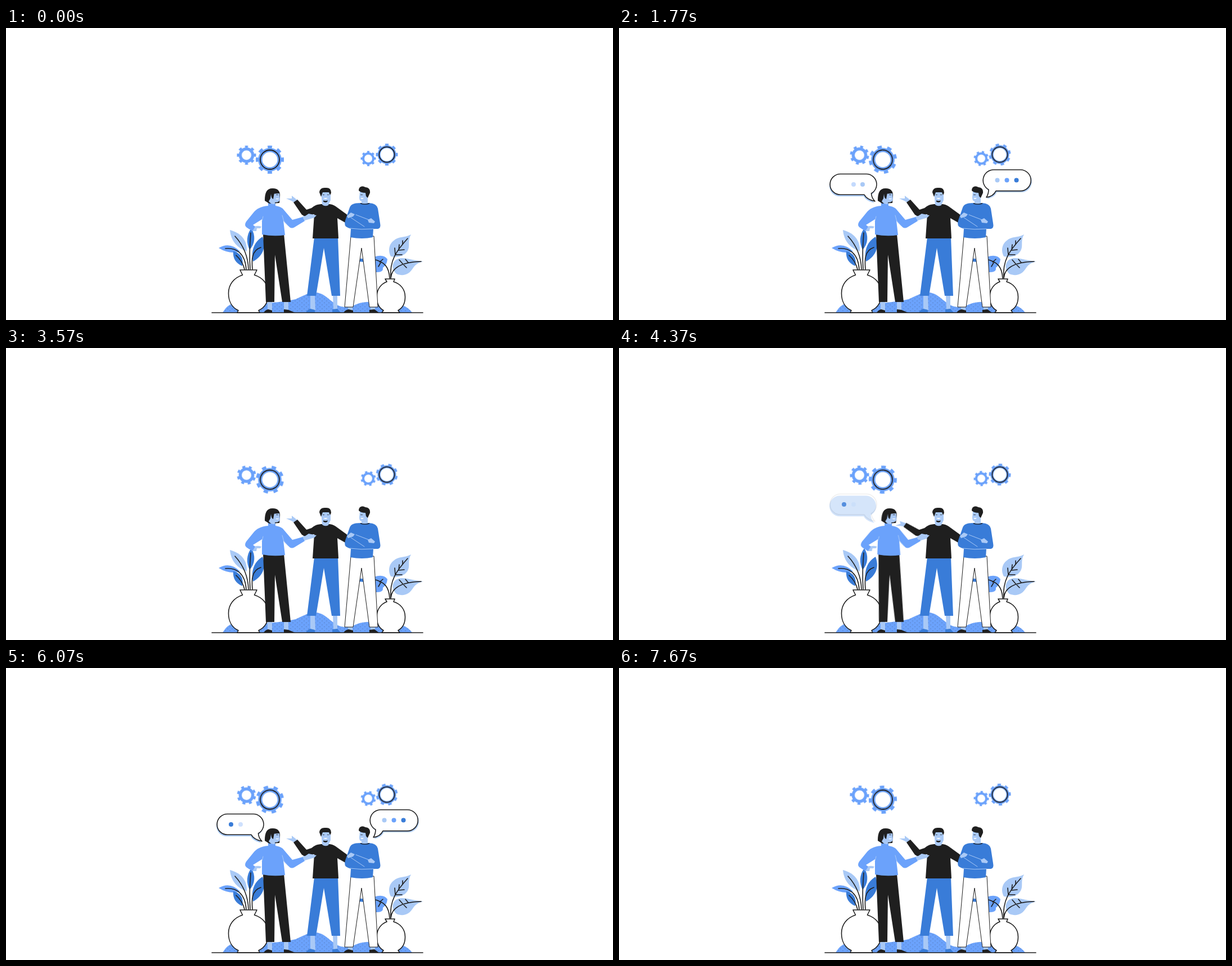
Animation of 1079x519 px, one loop 7710 ms. Source, as an HTML page:

```html
<!DOCTYPE html>
<html lang="en">
<head>
<meta charset="utf-8">
<title>Team talk</title>
<style>
html, body { margin: 0; width: 100%; height: 100%; overflow: hidden; background: #fff }
svg { display: block; width: 100%; height: 100% }
:root { --ink: #1f1f1f; --sky: #6ba2fb; --blue: #397cd8; --pale: #a9c9f6; --cycle: 3855ms }

.ink { fill: var(--ink) } .sky { fill: var(--sky) } .blue { fill: var(--blue) } .pale { fill: var(--pale) }
.line { fill: none; stroke: var(--ink); stroke-width: 1.6; stroke-linecap: round; stroke-linejoin: round }
.white { fill: #fff; stroke: var(--ink); stroke-width: 1.6; stroke-linejoin: round }
.thin { stroke-width: 1 }
.fold { fill: none; stroke: var(--pale); stroke-width: 1; stroke-linecap: round }

.spin, .lean, .wave, .wrap, .shade, .body, .dot { animation: var(--cycle) infinite both }
.spin { animation-name: spin; animation-timing-function: linear }
.back { animation-direction: reverse }
.lean { animation-name: lean; transform-origin: 0 487px; animation-timing-function: ease-in-out }
.wave { animation-name: wave; transform-origin: 531px 329px; animation-timing-function: ease-in-out }
.wrap { animation-name: wrap-left }
.right.wrap { animation-name: wrap-right }
.shade, .body, .dot { animation-timing-function: linear; animation-delay: calc(var(--start, 0ms) + var(--lag, 0ms) - var(--cycle)) }
.shade { animation-name: shade }
.body { animation-name: body }
.dot { animation-name: dot }
.right { --start: 740ms }
.second { --lag: 130ms } .third { --lag: 260ms }

@keyframes spin { to { transform: rotate(360deg) } }
@keyframes lean { 0%, 4% { transform: none } 17%, 35% { transform: skewX(-2.4deg) } 44%, 100% { transform: none } }
@keyframes wave { 0%, 7% { transform: none } 17%, 22% { transform: rotate(-27deg) } 32%, 100% { transform: none } }
@keyframes wrap-left { 0%, 4.9% { opacity: 0 } 5%, 85.5% { opacity: 1 } 91%, 100% { opacity: 0 } }
@keyframes wrap-right { 0%, 17.9% { opacity: 0 } 18%, 85.5% { opacity: 1 } 91%, 100% { opacity: 0 } }
@keyframes shade { 0%, 8% { opacity: 0 } 18.4%, 97.9% { opacity: 1 } 98%, 100% { opacity: 0 } }
@keyframes body { 0%, 13% { opacity: 0 } 18.4%, 97.9% { opacity: 1 } 98%, 100% { opacity: 0 } }
@keyframes dot {
  0%, 9.6% { opacity: 0 } 14.2%, 40.2% { opacity: 1 }
  44.1%, 53.2% { opacity: 0 } 56%, 91% { opacity: 1 } 91.1%, 100% { opacity: 0 }
}
</style>
</head>
<body>
<svg viewBox="0 0 1079 519" preserveAspectRatio="none">
  <defs>
    <pattern id="specks" width="8" height="7" patternUnits="userSpaceOnUse">
      <g class="ink" opacity=".6"><circle cx="2" cy="2" r=".5"/><circle cx="6" cy="5.5" r=".5"/></g>
    </pattern>
    <path id="hill" d="M385 506C392 494 400 488 412 489C440 492 490 488 515 482C530 475 538 470 550 470C572 471 580 496 604 496C620 496 622 487 645 487C690 488 712 490 722 506Z"/>
    <path id="bubbleL" d="M393.5 259.5H440A18.4 18.4 0 0 1 448.5 294Q449 302 455 308C446 306 439 302 436 296.3H393.5A18.4 18.4 0 0 1 393.5 259.5Z"/>
    <path id="bubbleR" d="M666 252H713.5A18.8 18.8 0 0 1 713.5 289.6H670C667 296 661 300 653 301Q657 295 657 287.3A18.8 18.8 0 0 1 666 252Z"/>
  </defs>

  <g id="gears"></g>

  <use href="#hill" class="sky"/>
  <use href="#hill" fill="url(#specks)"/>

  <!-- left plant -->
  <path class="sky" d="M378 391Q398 379 416 397Q398 403 378 391Z"/>
  <path class="pale" d="M398 359C416 364 429 375 428 397C412 391 400 380 398 359Z"/>
  <path class="blue" d="M436 356C444 368 443 384 433 394C427 382 427 368 436 356Z"/>
  <path class="blue" d="M456 371C464 392 454 407 439 415C435 396 441 380 456 371Z"/>
  <path class="blue" d="M404 397C416 399 423 408 420 423C408 418 403 409 404 397Z"/>
  <path class="line" d="M390 392C409 390 425 400 427 429M407 370Q430 395 431 429M435 364Q432 400 434 429M453 390C435 396 437 415 438 429M409 404Q421 415 424 429"/>
  <path class="white" d="M416 430H446L441.5 439C458 444 466.500 457 466.500 471.5C466.500 487 460 497 449 502L451 506H411L413 502C402 497 395.500 486 395.500 471.5C395.500 456 405 444 420.500 439Z"/>

  <!-- right plant -->
  <path class="pale" d="M720 367C713 378 719 387 714 396C707 407 694 408 684 406C679 397 680 385 689 378C697 370 710 373 720 367Z"/>
  <path class="pale" d="M742 415C732 417 727 421 722 429C714 440 704 441 694 437C686 430 685 420 692 413C703 404 718 413 742 415Z"/>
  <path class="sky" d="M654 407Q671 401 678 411Q677 421 670 426Q671 435 658 434Q650 423 654 407Z"/>
  <path class="blue" d="M624 409L640 411L638 416L627 415Z"/>
  <path class="line" d="M714 374C695 395 681 413 684 445M738 415C706 416 685 425 684 445M652 411C674 415 681 426 682 445M698 395L699 385M698 395L708 394M705 385V378M692 403L691 391M692 403L704 403M705 419L699 412M705 419L712 426M715 417L710 411M664 416L670 411M666 417L662 424"/>
  <path class="white" d="M674 446H691L689 451C702 455 709.500 465 709.500 478C709.500 490 704 498 697 502L700 506H668L671 502C664 498 659 490 659 478C659 465 666 455 677 451Z"/>

  <!-- woman -->
  <path class="pale" d="M465 486H473V502H465ZM494 486H502V502H494Z"/>
  <path class="ink" d="M458 506Q461 501 466 500L473 502V506ZM494 506V500L502 501L514 506Z"/>
  <g class="lean">
    <path class="ink" d="M457 366H494L506 487H491L478 403L477 487H462Z"/>
    <path class="pale" d="M440 354Q446 350 454 353L452 356L446 356L445 361L437 361ZM526 336L538 330L552 333L548 337L528 343Z"/>
    <path class="sky" d="M466 316C452 317 445 322 440 328L427 344Q422 352 430 356L438 361L443 353L439 350L455 340L455 367Q476 371 496 368L493 342L504 354Q508 357 513 354L531 343L527 336L509 341L492 321Q487 317 479 316V306H466Z"/>
    <path class="fold" d="M491 333L494 344L502 352M457 335L455 343"/>
    <path class="ink" d="M460 307C460 293 463 285 474 285C484 285 488 291 487 300L486 311L468 312Z"/>
    <path class="pale" d="M471 295L486 294L487 305Q486 310 478 310V313Q471 314 467 308L470 303Z"/>
    <path class="ink" d="M471 293L477 293L475 304Q471 303 471 293ZM480 296H484V296.800H480Z"/>
    <path d="M479 303L485 303Q483 306 479 303Z" fill="#fff"/>
  </g>

  <!-- middle man -->
  <path class="pale" d="M541 474H549L550 502H541ZM581 474H589V502H582Z"/>
  <path class="blue" d="M533 506Q535 501 541 499L549 501V506ZM580 506V500L589 499L595 506Z"/>
  <path class="blue" d="M548 372H590L594 476H579L565 391L551 476H535Z"/>
  <g class="wave">
    <path class="pale" d="M498 303L508 303L508 298L518 306L514 311L507 307Z"/>
    <path class="ink" d="M511 310L518 305L536 325L533 335L526 332Z"/>
  </g>
  <path class="ink" d="M560 313C550 314 547 317 543 320L531 324Q525 329 529 334L548 331L545 374H591L589 338L605 347L608 333L586 317Q580 313 574 313Z"/>
  <path class="pale" d="M560 290H577L577 306Q574 312 573 315Q567 318 562 314Z"/>
  <path class="ink" d="M557 292Q558 283 568 284Q578 283 578 293L576 297L574 292L563 292L560 300ZM564 306.500Q568 308 572 306.500L571 309Q567 311 564 308.500ZM563 296H566V296.800H563ZM571 296H574V296.800H571Z"/>
  <path d="M564 302H572Q568 306 564 302Z" fill="#fff"/>
  <path class="pale" d="M529 336L538 330L552 333L548 337L532 341Z"/>

  <!-- right man -->
  <path class="pale" d="M608 494H616V503H608ZM648 494H656V503H648Z"/>
  <path class="ink" d="M600 506Q603 501 609 500L617 502V506ZM646 506V501L655 500L663 506Z"/>
  <path class="white thin" d="M613 370H654L661 496H646L632 391L617 496H602Z"/>
  <path class="blue" d="M630 311C617 311 613 314 611 319L603 342Q600 353 608 355L613 357L612 372Q633 376 652 372L653 357L661 357Q667 356 665 347L661 321Q659 312 646 311Z"/>
  <path class="pale" d="M606 334L613 328L620 331L617 335L608 338ZM643 341L649 338L656 344L654 347L645 346Z"/>
  <path class="fold" d="M622 332L648 342M613 337L637 353M611 356Q632 359 653 357"/>
  <path class="pale" d="M629 290H643L643 311Q637 314 632 311V308Q628 308 628 301Z"/>
  <path class="ink" d="M627 289C627 281 634 280 639 283Q648 284 647 293L643 302L640 299L639 293Q631 293 627 289ZM630 296H634V296.800H630ZM630 311Q638 314 646 311V312.500Q638 315 630 312.500Z"/>
  <path d="M630 302H636Q633 306 630 302Z" fill="#fff"/>

  <path class="line" d="M366 506H741"/>

  <!-- speech bubbles -->
  <g class="wrap">
    <use href="#bubbleL" class="pale shade" x="-1" y="3"/>
    <use href="#bubbleL" class="white body"/>
    <circle class="blue dot" cx="400" cy="278" r="4"/>
    <circle class="sky dot second" cx="417" cy="278" r="4"/>
    <circle class="pale dot third" cx="433" cy="278" r="4"/>
  </g>
  <g class="wrap right">
    <use href="#bubbleR" class="pale shade" x="1.5" y="2.5"/>
    <use href="#bubbleR" class="white body"/>
    <circle class="blue dot" cx="706.5" cy="270.5" r="4"/>
    <circle class="sky dot second" cx="689.5" cy="270.5" r="4"/>
    <circle class="pale dot third" cx="672.5" cy="270.5" r="4"/>
  </g>
</svg>
<script>
// Each gear is a solid ring plus a dashed ring that forms eight teeth.
function gear(x, y, outer, root, hole, band, reverse) {
  const ring = (from, to, extra = '') =>
    `<circle r="${(from + to) / 2}" fill="none" stroke="#6ba2fb" stroke-width="${to - from}" ${extra}/>`;
  const teeth = 'pathLength="16" stroke-dasharray=".9 1.1" stroke-dashoffset=".45"';
  const inkBand = band ? `<circle r="${band}" fill="none" stroke="#1f1f1f" stroke-width="1.8"/>` : '';
  return `<g transform="translate(${x} ${y})"><g class="spin ${reverse ? 'back' : ''}">
    ${ring(hole, root)}${ring(root - 1, outer, teeth)}${inkBand}</g></g>`;
}
document.getElementById('gears').innerHTML =
  gear(427.5, 226, 17, 13.8, 8.5, 0, true) + gear(469, 234, 25, 20.8, 13.5, 17) +
  gear(644, 232, 13.5, 11, 7, 0, true) + gear(677, 225, 19.5, 16.5, 11.5, 13.7);
</script>
</body>
</html>
```
